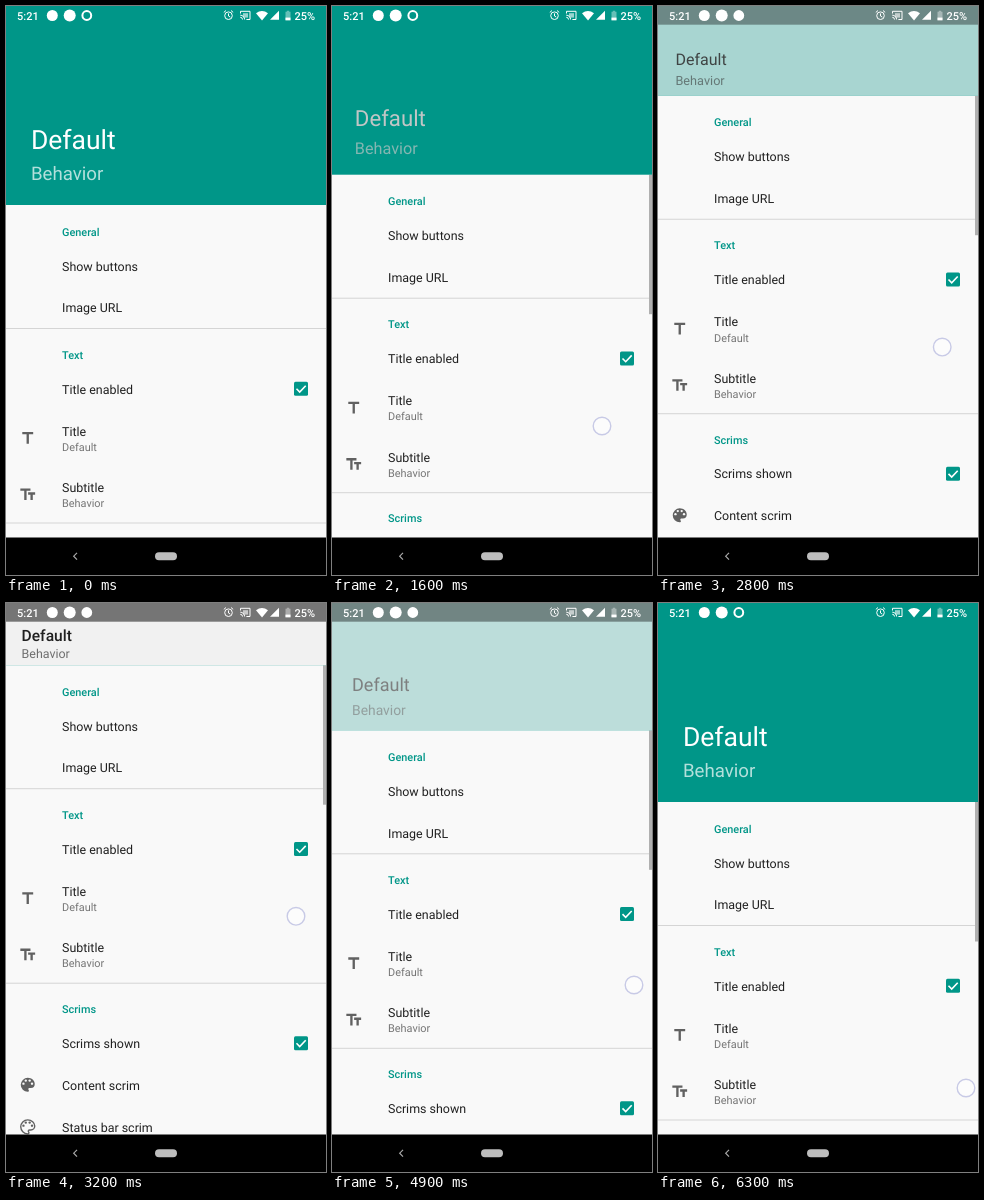
An HTML page that plays this animation: 320x569 px, repeating every 6.4 s.

```html
<!DOCTYPE html>
<html lang="en">
<head>
<meta charset="utf-8">
<title>Collapsing toolbar</title>
<style>
  html, body { margin: 0; height: 100%; overflow: hidden; background: #000; }
  svg { display: block; width: 100%; height: 100%; }
  text { font-family: Roboto, "Open Sans", sans-serif; text-rendering: geometricPrecision; }
  .head { font-size: 10.9px; font-weight: 500; fill: #009688; }
  .item { font-size: 12.45px; fill: #212121; }
  .note { font-size: 10.9px; fill: #757575; }
  .icon { fill: #616161; }
  .rule { fill: #d5d5d5; }
  .bar text { font-size: 11px; font-weight: 500; fill: #fff; }
</style>
</head>
<body>
<svg viewBox="0 0 320 569" preserveAspectRatio="none">
  <defs>
    <path id="title" d="M5 4v3h5.5v12h3V7H19V4z"/>
    <path id="fields" d="M2.5 4v3h5v12h3V7h5V4zM21.5 9h-9v3h3v7h3v-7h3z"/>
    <path id="palette" d="M12 3a9 9 0 0 0 0 18c.83 0 1.5-.67 1.5-1.5 0-.39-.15-.74-.39-1.01-.23-.26-.38-.61-.38-.99 0-.83.67-1.5 1.5-1.5H16a5 5 0 0 0 5-5C21 6.58 16.97 3 12 3z"/>
    <g id="dots">
      <circle cx="6.5" cy="10.5" r="1.5"/><circle cx="9.5" cy="6.5" r="1.5"/>
      <circle cx="14.5" cy="6.5" r="1.5"/><circle cx="17.5" cy="10.5" r="1.5"/>
    </g>
    <g id="check">
      <rect x="288" y="-7" width="14" height="14" rx="1.5" fill="#009688"/>
      <path d="M290.5 .1l3.2 3.2 6-6.3" fill="none" stroke="#fff" stroke-width="1.6"/>
    </g>
  </defs>

  <rect width="320" height="532" fill="#f9f9f9"/>

  <g id="list">
    <text class="head" x="56" y="30.6">General</text>
    <text class="item" x="56" y="65.5">Show buttons</text>
    <text class="item" x="56" y="107.3">Image URL</text>
    <rect class="rule" y="123" width="320" height="1"/>

    <text class="head" x="56" y="153.6">Text</text>
    <text class="item" x="56" y="188.5">Title enabled</text>
    <use href="#check" y="183.7"/>
    <use class="icon" href="#title" transform="translate(12.4 223.9) scale(.778)"/>
    <text class="item" x="56" y="230.5">Title</text>
    <text class="note" x="56" y="245.8">Default</text>
    <use class="icon" href="#fields" transform="translate(12.4 280.3) scale(.778)"/>
    <text class="item" x="56" y="287">Subtitle</text>
    <text class="note" x="56" y="302.2">Behavior</text>
    <rect class="rule" y="317.5" width="320" height="1"/>

    <text class="head" x="56" y="347.8">Scrims</text>
    <text class="item" x="56" y="382.7">Scrims shown</text>
    <use href="#check" y="378"/>
    <g class="icon" transform="translate(12.4 410.3) scale(.778)">
      <use href="#palette"/><use href="#dots" fill="#f9f9f9"/>
    </g>
    <text class="item" x="56" y="424.6">Content scrim</text>
    <g class="icon" transform="translate(12.4 452.3) scale(.778)">
      <use href="#palette" fill="none" stroke="#616161" stroke-width="1.8"/><use href="#dots"/>
    </g>
    <text class="item" x="56" y="466.5">Status bar scrim</text>
    <rect id="thumb" x="317" width="3" height="139.5" fill="#b0b0b0"/>
  </g>

  <rect class="header" width="320" fill="#009688"/>
  <rect class="header" id="scrim" width="320" fill="#f1f1f1"/>
  <rect id="shade" width="320" height="18.7"/>
  <text id="name">Default</text>
  <text id="sub">Behavior</text>

  <g class="bar" fill="#fff">
    <text x="11" y="13.6">5:21</text>
    <circle cx="46.3" cy="9.5" r="5.5"/>
    <circle cx="63.7" cy="9.5" r="6"/>
    <circle id="ring" cx="80.8" cy="9.5" r="4.4" stroke="#fff" stroke-width="2"/>
    <g fill="none" stroke="#fff">
      <circle cx="222.5" cy="9.7" r="3.8"/>
      <path d="M222.5 7.4v2.6l1.8 1.1M217.8 6.4l2.2-1.9M227.2 6.4l-2.2-1.9"/>
      <path d="M234.5 7.5V5.3h9.5v8.2h-3.6M234.3 9.2a4.3 4.3 0 0 1 4.3 4.3M234.3 11.3a2.2 2.2 0 0 1 2.2 2.2"/>
    </g>
    <rect x="237" y="7.2" width="5" height="4.4" opacity=".6"/>
    <path d="M250 7.3q6-4.4 12 0l-6 7.2z"/>
    <path d="M264 13.8h9V4.8z"/>
    <path d="M279.5 5.7h1.3v-1h2.4v1h1.3v8.6h-5z" opacity=".4"/>
    <path d="M279.5 11.6h5v2.7h-5z"/>
    <text x="288.5" y="13.6">25%</text>
  </g>

  <circle id="touch" r="8.8" fill="#fff" fill-opacity=".45" stroke="#c8cae6" stroke-width="1.4"/>

  <rect y="531.5" width="320" height="37.5"/>
  <path d="M71 546.8l-3.3 3.4 3.3 3.4" fill="none" stroke="#aaa" stroke-width="1.2"/>
  <rect x="149" y="546.3" width="22" height="8" rx="4" fill="#bdbdbd"/>
</svg>

<script>
const LOOP = 6400, STEP = 100;
const OPEN = 199, CLOSED = 62.2;
// time, x and y of the finger
const DRAG = [
  [900, 262, 464], [1600, 270, 420], [2300, 277, 375.7], [3200, 290, 313.3],
  [4050, 292, 313.3], [4200, 293, 324.5], [4900, 302, 382], [6300, 308, 485]
];
const el = id => document.getElementById(id);
const clamp = (v, lo, hi) => Math.min(hi, Math.max(lo, v));
const mix = (a, b, f) => a + (b - a) * f;
const set = (node, attrs) => {
  for (const k in attrs) node.setAttribute(k, attrs[k]);
};

function finger(t) {
  if (t <= DRAG[0][0]) return DRAG[0].slice(1);
  let i = 1;
  while (i < DRAG.length - 1 && t > DRAG[i][0]) i++;
  const a = DRAG[i - 1], b = DRAG[i];
  const f = clamp((t - a[0]) / (b[0] - a[0]), 0, 1);
  return [mix(a[1], b[1], f), mix(a[2], b[2], f)];
}

// cubic Bezier easing, solved by bisection
function ease(x, x1, y1, x2, y2) {
  const curve = (s, p, q) => 3 * (1 - s) ** 2 * s * p + 3 * (1 - s) * s * s * q + s ** 3;
  let lo = 0, hi = 1;
  for (let i = 0; i < 24; i++) {
    const m = (lo + hi) / 2;
    if (curve(m, x1, x2) < x) lo = m; else hi = m;
  }
  return curve(lo, y1, y2);
}

function scrimAlpha(t) {
  const part = start => clamp((t - start) / 600, 0, 1);
  return t < 4000 ? ease(part(2320), .4, 0, 1, 1) : 1 - ease(part(4860), 0, 0, .2, 1);
}

function label(node, f, x, y, sizes, alphas) {
  const c = Math.round(255 * (1 - f));
  set(node, {
    x, y,
    'font-size': mix(...sizes, 1 - (1 - f) ** 2),
    fill: `rgba(${c},${c},${c},${mix(...alphas, f)})`
  });
}

function draw(t) {
  const [x, y] = finger(t);
  const h = clamp(y - (t < 3600 ? 251.3 : 254.7), CLOSED, OPEN);
  const f = (OPEN - h) / (OPEN - CLOSED);
  const a = scrimAlpha(t);
  const left = mix(24.9, 15.6, f);

  set(el('list'), { transform: `translate(0 ${h})` });
  document.querySelectorAll('.header').forEach(r => set(r, { height: h }));
  set(el('scrim'), { opacity: a });
  set(el('shade'), { opacity: .515 * a });
  label(el('name'), f, left, mix(143.3, 38.3, f), [26.5, 15.57], [1, .87]);
  label(el('sub'), f, left, mix(174.3, 54.8, f), [18.7, 12.45], [.7, .54]);
  set(el('name'), { 'font-weight': f > .995 ? 500 : 400 });

  const solid = (t >= 2700 && t < 3600) || (t >= 4600 && t < 5400);
  set(el('ring'), { fill: solid ? '#fff' : 'none' });
  set(el('thumb'), { opacity: t > 1100 ? 1 : 0 });
  set(el('touch'), { cx: x, cy: y, opacity: t >= 900 ? 1 : 0 });
}

const begin = performance.now();
function tick() {
  const t = (performance.now() - begin) % LOOP;
  draw(Math.floor(t / STEP) * STEP);
  requestAnimationFrame(tick);
}
draw(0);
requestAnimationFrame(tick);
</script>
</body>
</html>
```
